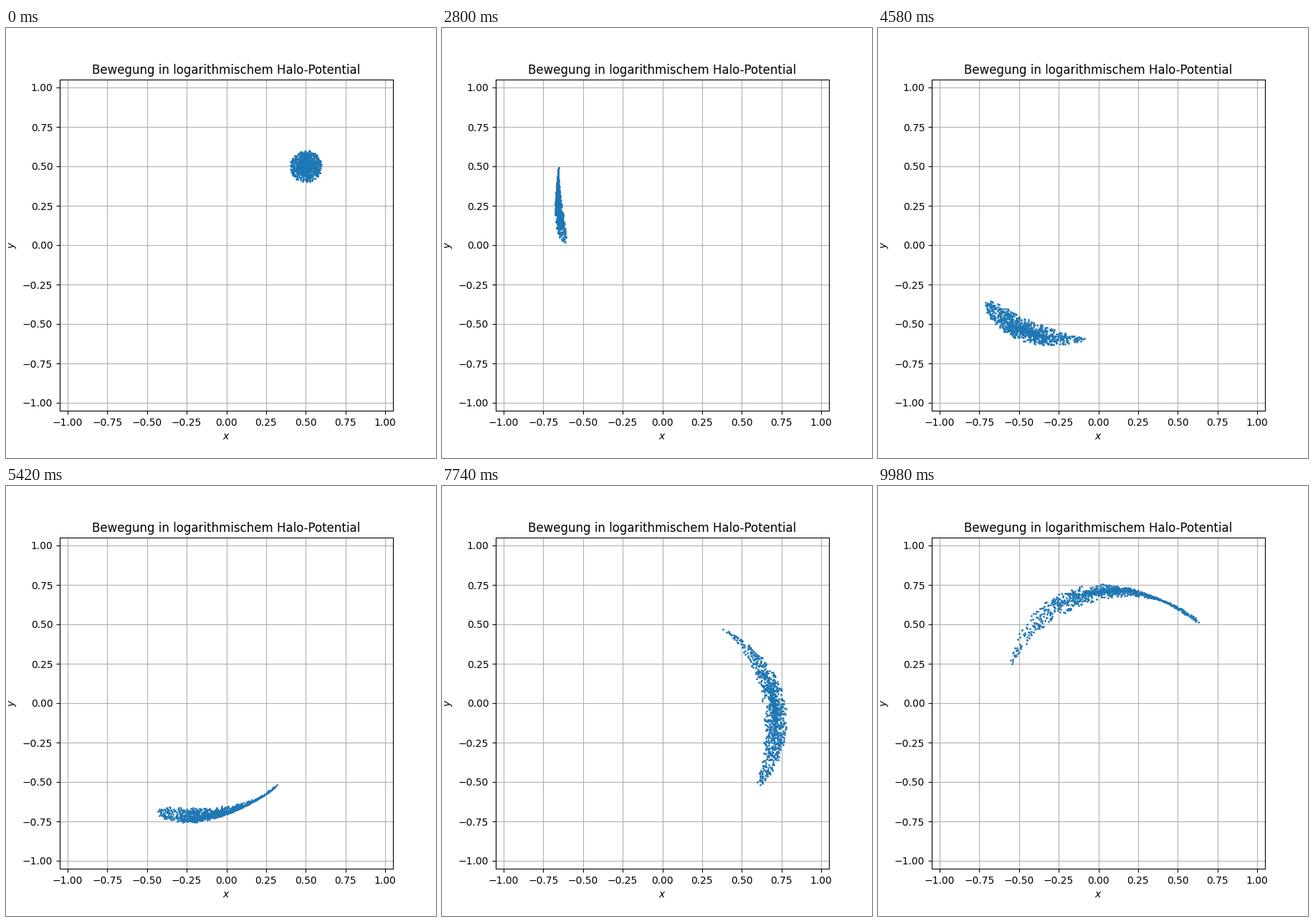
Write a matplotlib script that moves like this. It is 600 by 600 pixels and loops after 10000 ms.

```python
import numpy as np
import matplotlib.pyplot as plt
from matplotlib.animation import FuncAnimation

FRAMES = 500
INTERVAL = 20      # ms
DT = 0.01          # simulated time per frame
SUBSTEPS = 2
COUNT = 1000
RADIUS = 0.1
CENTER = np.array([0.5, 0.5])
SPEED = 1.0        # circular speed, the same at every radius


def start_cloud():
    """Disc of particles that all share one tangential velocity."""
    rng = np.random.default_rng(3)
    r = RADIUS * rng.random(COUNT)
    phi = 2 * np.pi * rng.random(COUNT)
    pos = CENTER + np.column_stack([r * np.cos(phi), r * np.sin(phi)])
    vel = np.tile(SPEED * np.array([-1, 1]) / np.sqrt(2), (COUNT, 1))
    return pos, vel


def accel(pos):
    """Force of the potential SPEED**2 * ln(r)."""
    return -SPEED**2 * pos / (pos**2).sum(axis=1, keepdims=True)


def simulate():
    pos, vel = start_cloud()
    h = DT / SUBSTEPS
    path = np.empty((FRAMES, COUNT, 2))
    for i in range(FRAMES):
        path[i] = pos
        for _ in range(SUBSTEPS):
            vel = vel + accel(pos) * h / 2
            pos = pos + vel * h
            vel = vel + accel(pos) * h / 2
    return path


path = simulate()

fig, ax = plt.subplots(figsize=(6, 6), dpi=100)
ax.set_xlim(-1.05, 1.05)
ax.set_ylim(-1.05, 1.05)
ax.set_xlabel("$x$")
ax.set_ylabel("$y$")
ax.set_title("Bewegung in logarithmischem Halo-Potential")
ax.grid(True)

# Render the static axes once and keep them as a backdrop for speed.
fig.canvas.draw()
backdrop = np.asarray(fig.canvas.buffer_rgba()).copy()
fig.figimage(backdrop, zorder=-1)
ax.set_title("")
ax.set_axis_off()

dots, = ax.plot([], [], "o", color="C0", markersize=1)


def update(i):
    dots.set_data(path[i, :, 0], path[i, :, 1])
    return dots,


anim = FuncAnimation(fig, update, frames=FRAMES, interval=INTERVAL,
                     repeat=True, repeat_delay=0, blit=False)
plt.show()
```
